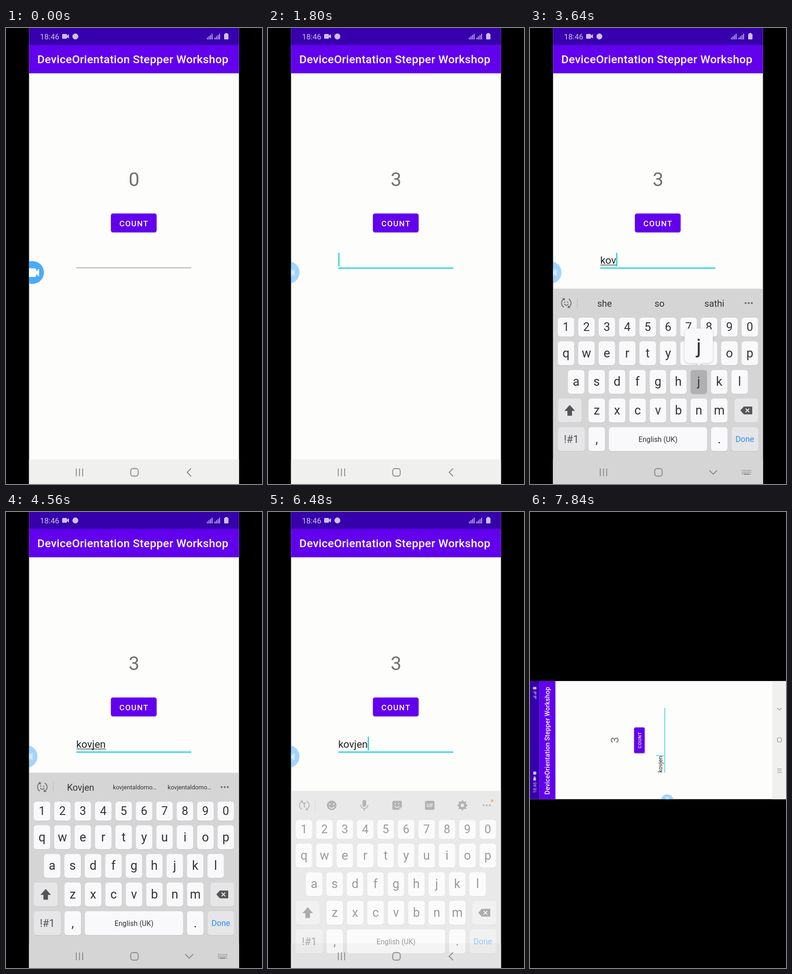
These frames come from a looping animation (561x998 px, 8000 ms). An HTML page with a canvas:

```html
<!DOCTYPE html>
<html lang="en">
<head>
<meta charset="utf-8">
<title>Counter screen</title>
<style>
  html, body { margin: 0; width: 100%; height: 100%; overflow: hidden; background: #000; }
  canvas { display: block; width: 561px; height: 998px; }
</style>
</head>
<body>
<canvas id="stage" width="561" height="998"></canvas>
<script>
const ctx = document.getElementById('stage').getContext('2d');
const LOOP = 8000, STEP = 40;
const LEFT = 50.5, WIDTH = 460;
const NAME = 'kovjen';
const TEAL = '#08d0cc', PURPLE = '#6200ee';

const taps = [720, 1000, 1280];
const counted = [840, 1120, 1400];
// key, press time, release time
const strokes = [
  ['k', 3120, 3200], ['o', 3280, 3360], ['v', 3440, 3520],
  ['j', 3600, 3720], ['e', 3760, 3840], ['n', 3920, 4040]
];
const blinks = [1800, 2400, 2880, 4560, 5080, 5560, 6080, 6680, 7240];
const DONE_DOWN = 6120, DONE_UP = 6240, COMMIT = 6280;
const ROTATE = 7840;

const clamp = (v) => Math.max(0, Math.min(1, v));
const span = (t, a, b) => clamp((t - a) / (b - a));
const between = (t, a, b) => t >= a && t < b;

function rect(x, y, w, h, color) {
  ctx.fillStyle = color;
  ctx.fillRect(x, y, w, h);
}

function box(x, y, w, h, r, color) {
  ctx.beginPath();
  ctx.roundRect(x, y, w, h, r);
  ctx.fillStyle = color;
  ctx.fill();
}

function dot(x, y, r, color) {
  ctx.beginPath();
  ctx.arc(x, y, r, 0, Math.PI * 2);
  ctx.fillStyle = color;
  ctx.fill();
}

function path(points, closed) {
  ctx.beginPath();
  points.forEach(([x, y]) => ctx.lineTo(x, y));
  if (closed) ctx.closePath();
}

function poly(points, color) {
  path(points, true);
  ctx.fillStyle = color;
  ctx.fill();
}

function line(points, color, width) {
  path(points);
  ctx.strokeStyle = color;
  ctx.lineWidth = width;
  ctx.stroke();
}

function arc(x, y, r, a, b, color, width) {
  ctx.beginPath();
  ctx.arc(x, y, r, a, b);
  ctx.strokeStyle = color;
  ctx.lineWidth = width;
  ctx.stroke();
}

function label(str, x, y, size, color, align = 'center', weight = 400, spacing = 0) {
  ctx.font = `${weight} ${size}px Roboto, sans-serif`;
  ctx.letterSpacing = spacing + 'px';
  ctx.textAlign = align;
  ctx.fillStyle = color;
  ctx.fillText(str, x, y);
  const w = ctx.measureText(str).width;
  ctx.letterSpacing = '0px';
  return w;
}

function statusBar() {
  rect(LEFT, 0, WIDTH, 37, '#3700ad');
  const c = '#cdc0ea';
  label('18:46', 74.5, 25, 17, c, 'left');
  box(123, 13, 10.5, 10.5, 1.5, c);
  poly([[133, 17], [138, 13.5], [138, 23], [133, 19.5]], c);
  dot(152, 18.5, 6.5, c);
  for (const x of [440.5, 457]) {
    for (let i = 0; i < 4; i++) {
      const h = 4 + i * 2.8;
      rect(x + i * 3.4, 25 - h, 1.8, h, c);
    }
  }
  box(478, 12.5, 9.5, 12.5, 1.5, c);
  rect(480.5, 11, 4.5, 2, c);
}

function appBar() {
  rect(LEFT, 99, WIDTH, 1, 'rgba(0,0,0,.12)');
  rect(LEFT, 37, WIDTH, 62, PURPLE);
  label('DeviceOrientation Stepper Workshop', 68.5, 77, 24.8, '#fff', 'left', 500, 0.31);
}

function button(t) {
  const held = taps.some((p) => between(t, p, p + 160));
  ctx.save();
  ctx.shadowColor = 'rgba(0,0,0,.35)';
  ctx.shadowBlur = held ? 5 : 3;
  ctx.shadowOffsetY = held ? 2 : 1.2;
  box(230, 406, 100, 41, 4.5, PURPLE);
  ctx.restore();
  ctx.save();
  ctx.beginPath();
  ctx.roundRect(230, 406, 100, 41, 4.5);
  ctx.clip();
  for (const p of taps) {
    if (!between(t, p, p + 320)) continue;
    const a = 0.24 * (1 - span(t, p + 160, p + 320));
    dot(280, 426.5, 18 + 42 * span(t, p - 40, p + 200), `rgba(255,255,255,${a})`);
  }
  ctx.restore();
  label('COUNT', 248.5, 433.5, 17.2, '#fff', 'left', 500, 1.5);
}

function field(t) {
  const focus = t >= 1800;
  if (focus) rect(154, 524.3, 252, 2.3, TEAL);
  else rect(154, 524.3, 252, 1.2, '#858585');

  const typed = NAME.slice(0, strokes.filter((s) => t >= s[2]).length);
  const w = typed ? label(typed, 154, 516, 22.4, '#202020', 'left') : 0;
  if (typed && t < COMMIT) rect(154.5, 518, w, 1.3, '#333');

  const on = between(t, 3120, 4560) || blinks.filter((b) => t >= b).length % 2 === 1;
  if (focus && on) rect(154.2 + w, 492, 2.3, 30, TEAL);
}

function bubble(t) {
  const k = span(t, 720, 1040);
  const x = 58 - 14 * k * (2 - k);
  ctx.save();
  ctx.beginPath();
  ctx.rect(LEFT, 500, WIDTH, 80);
  ctx.clip();
  ctx.globalAlpha = 1 - 0.5 * k;
  dot(x, 535, 25, '#4aabfc');
  box(x - 13, 526, 21, 19, 3, '#fff');
  poly([[x + 7, 533], [x + 14.5, 527], [x + 14.5, 544], [x + 7, 538]], '#fff');
  ctx.restore();
}

function navIcons(t) {
  const c = '#858585';
  for (const x of [154, 161, 168]) line([[x, 964], [x, 981]], c, 1.8);
  ctx.beginPath();
  ctx.roundRect(273.3, 964.3, 16.4, 16.4, 5);
  ctx.strokeStyle = c;
  ctx.lineWidth = 1.9;
  ctx.stroke();
  if (between(t, 2240, COMMIT)) {
    line([[393, 968], [401.5, 976.5], [410, 968]], c, 1.9);
    for (let row = 0; row < 3; row++) {
      for (let i = 0; i < 6; i++) rect(464.5 + i * 3.6, 967.5 + row * 4, 2, 2, c);
    }
    rect(469, 975.2, 11, 2.4, c);
  } else {
    line([[405.5, 964], [397, 972.5], [405.5, 981]], c, 1.9);
  }
}

function swapArrows(x, y, c) {
  arc(x, y, 10.5, 2.1, 4.1, c, 1.7);
  arc(x, y, 10.5, -1.04, 0.96, c, 1.7);
  poly([[x - 9, y - 10.5], [x - 3, y - 10.5], [x - 4, y - 5]], c);
  poly([[x + 9, y + 10.5], [x + 3, y + 10.5], [x + 4, y + 5]], c);
}

function smile(x, y, r, c) {
  dot(x - r * 0.4, y - r * 0.25, r * 0.16, c);
  dot(x + r * 0.4, y - r * 0.25, r * 0.16, c);
  arc(x, y + r * 0.05, r * 0.55, 0.3, Math.PI - 0.3, c, 1.8);
}

function gear(x, y, c) {
  const pts = [];
  for (let i = 0; i < 32; i++) {
    const a = (i - 0.5) * Math.PI / 16;
    const r = i % 4 < 2 ? 11.2 : 8.6;
    pts.push([x + r * Math.cos(a), y + r * Math.sin(a)]);
  }
  poly(pts, c);
  dot(x, y, 3.8, '#d5d5d5');
}

function toolbar() {
  const c = '#666', bg = '#d5d5d5', y = 602;
  swapArrows(79.5, y, c);
  label('T', 79.5, y + 5, 14, c, 'center', 700);
  dot(139.5, y, 10.5, c);
  smile(139.5, y, 10.5, bg);

  box(207, y - 12, 8, 15, 4, c);
  arc(211, y - 1, 8, 0, Math.PI, c, 2);
  rect(210, y + 7, 2, 5, c);

  box(272.5, y - 10, 21, 20, 3.5, c);
  poly([[294, y + 3], [294, y + 11], [286, y + 11]], bg);
  poly([[286, y + 9.5], [286, y + 3], [293, y + 3]], '#8a8a8a');
  smile(282.5, y - 1, 9, bg);

  box(344, y - 10, 21, 20, 3.5, c);
  label('GIF', 354.5, y + 4, 10, bg, 'center', 700);
  gear(426, y, c);
  dot(491, y - 10, 3, '#ff6a10');
}

function suggestions(t) {
  const c = '#333';
  swapArrows(79.5, 602, '#666');
  smile(79.5, 602, 8, '#666');
  if (t < 4320) {
    ['she', 'so', 'sathi'].forEach((s, i) => label(s, 163.5 + i * 120.3, 610, 20, c));
  } else {
    label('Kovjen', 163.5, 610, 20, c);
    for (const x of [282, 402]) label('kovjentaldomo…', x, 607, 13.2, c);
  }
}

function keyBox(x, y, w, h, color) {
  box(x, y + 1, w, h, 6, 'rgba(0,0,0,.09)');
  box(x, y, w, h, 6, color);
}

function keys(t) {
  const pitch = 44.77, ink = '#333', soft = '#e6e6e8';
  const held = strokes.find((s) => between(t, s[1], s[2] + (s[1] === 3920 ? 80 : 0)));
  let pop = null;
  const row = (chars, cx, top, h, size) => {
    [...chars].forEach((ch, i) => {
      const x = cx + i * pitch;
      const down = held && held[0] === ch;
      keyBox(x - 18, top, 36, h, down ? '#b0b0b2' : '#f9f9fb');
      label(ch, x, top + h / 2 + size * 0.325, size, ink);
      if (down) pop = [ch, x, top];
    });
  };
  row('1234567890', 78.8, 634, 41.5, 25.5);
  row('qwertyuiop', 78.8, 685.7, 52.3, 27);
  row('asdfghjkl', 101.2, 748.4, 52.3, 27);
  row('zxcvbnm', 146.2, 811, 52.3, 27);
  row(',', 146.2, 873.7, 52.3, 27);
  row('.', 414.8, 873.7, 52.3, 27);

  keyBox(61, 811, 52, 52.3, soft);
  poly([[87, 825], [98.5, 838], [92, 838], [92, 848.5], [82, 848.5], [82, 838], [75.5, 838]], '#555');
  keyBox(448, 811, 52, 52.3, soft);
  poly([[461, 837], [468.5, 828.5], [487, 828.5], [487, 845.5], [468.5, 845.5]], '#555');
  line([[472.5, 833], [480.5, 841]], soft, 2.2);
  line([[480.5, 833], [472.5, 841]], soft, 2.2);

  keyBox(61, 873.7, 59, 52.3, soft);
  label('!#1', 90.7, 908, 23, '#555');
  keyBox(173, 873.7, 215, 52.3, '#f9f9fb');
  label('English (UK)', 280.5, 905.5, 15.7, ink);
  keyBox(442, 873.7, 58, 52.3, between(t, DONE_DOWN, DONE_UP) ? '#b0b0b2' : soft);
  label('Done', 470.7, 906, 17.8, '#2f8ff5');

  if (pop) {
    const [ch, x, top] = pop;
    ctx.save();
    ctx.shadowColor = 'rgba(0,0,0,.22)';
    ctx.shadowBlur = 4;
    ctx.shadowOffsetY = 1;
    box(x - 31, top - 91, 62, 76, 11, '#f9f9fb');
    ctx.restore();
    poly([[x - 7, top - 15], [x + 7, top - 15], [x, top - 10]], '#f9f9fb');
    label(ch, x, top - 36, 45, ink);
  }
}

function keyboard(t) {
  if (!between(t, 2400, 6520)) return;
  const enter = span(t, 2360, 2720), leave = span(t, 6320, 6520);
  const shift = 81 * (1 - enter) ** 2 + 62.5 * leave ** 2;
  // Rendered as one layer so that the fade is uniform.
  const alpha = span(t, 2320, 2520) * (1 - leave ** 3);
  ctx.save();
  ctx.beginPath();
  ctx.rect(LEFT, 0, WIDTH, 998);
  ctx.clip();
  ctx.translate(0, shift);
  rect(LEFT, 570.5, WIDTH, 428, '#d5d5d5');
  rect(103, 591, 1.2, 23, '#bcbcbc');
  for (const x of [472.5, 479.2, 486]) dot(x, 602, 2.1, '#666');
  if (between(t, 3240, COMMIT)) suggestions(t);
  else toolbar();
  keys(t);
  if (alpha < 1) {
    const veil = 1 - alpha;
    rect(LEFT, 570, WIDTH, 374 - shift, `rgba(253,253,253,${veil})`);
    rect(LEFT, 944 - shift, WIDTH, 60 + shift, `rgba(240,240,239,${veil})`);
  }
  ctx.restore();
}

function screen(t) {
  rect(LEFT, 0, WIDTH, 998, '#fdfdfc');
  statusBar();
  appBar();
  label(String(counted.filter((c) => t >= c).length), 280.5, 346, 42, '#727272');
  button(t);
  field(t);
  bubble(t);
  rect(LEFT, 944, WIDTH, 54, '#f0f0ef');
  keyboard(t);
  navIcons(t);
}

function draw(t) {
  ctx.setTransform(1, 0, 0, 1, 0, 0);
  rect(0, 0, 561, 998, '#000');
  if (t >= ROTATE) {
    const k = 561 / 998;
    ctx.translate(0, 628.5);
    ctx.rotate(-Math.PI / 2);
    ctx.scale(k, k);
    ctx.translate(-LEFT, 0);
  }
  screen(t);
}

const start = performance.now();
function tick() {
  const t = (performance.now() - start) % LOOP;
  draw(Math.floor(t / STEP) * STEP);
  requestAnimationFrame(tick);
}
tick();
</script>
</body>
</html>
```
